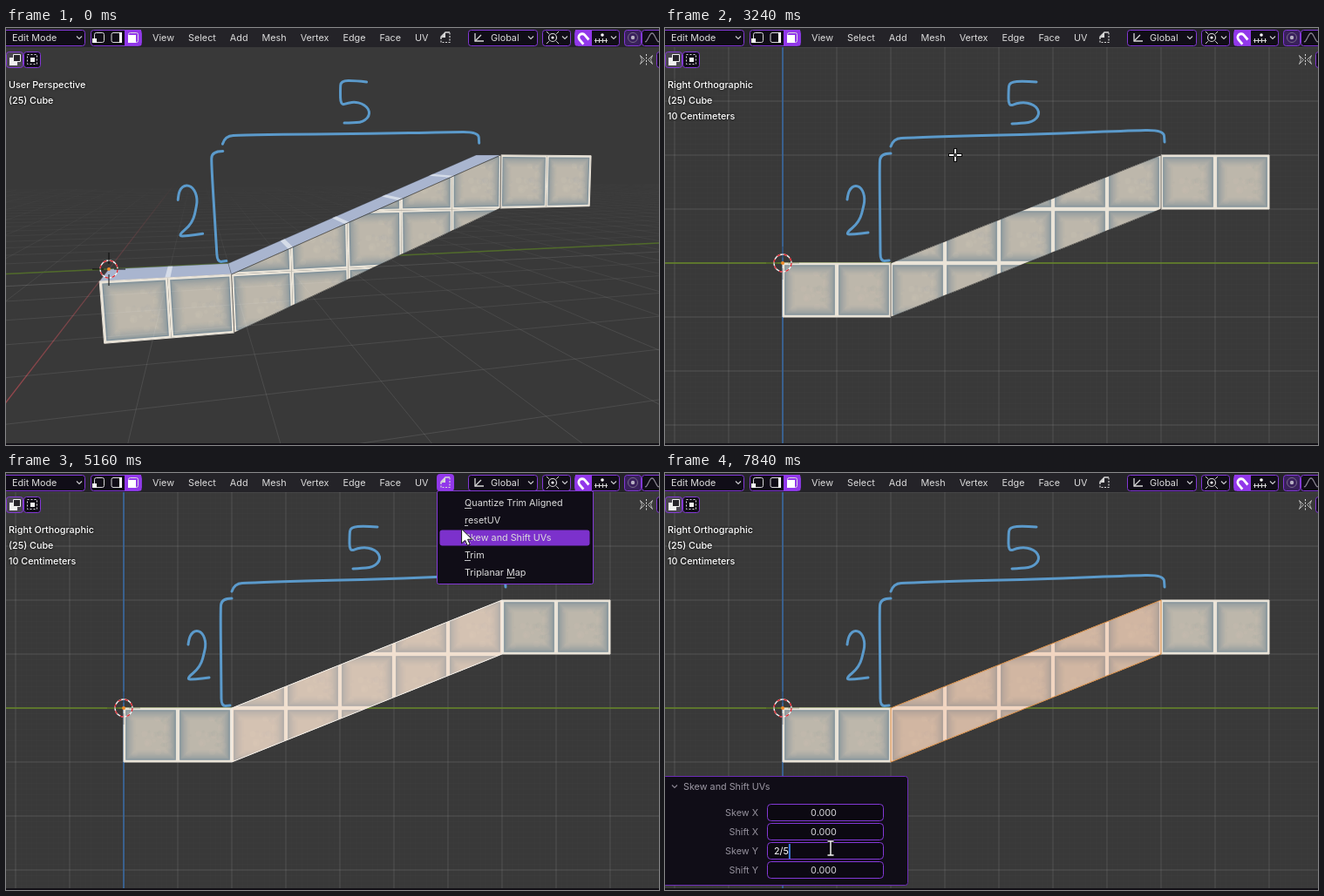
Recreate the animation shown at these times as an HTML page with a canvas. Size 749 by 479 pixels, loop 8000 ms.

```html
<!DOCTYPE html>
<html>
<head>
<meta charset="utf-8">
<style>
  html, body { margin: 0; width: 100%; height: 100%; overflow: hidden; background: #393939; }
  canvas { display: block; }
</style>
</head>
<body>
<canvas id="stage" width="749" height="479"></canvas>
<script>
const W = 749, H = 479, LOOP = 8000;
const ctx = document.getElementById('stage').getContext('2d');
const PURPLE = '#8338d6', BRIGHT = '#9238ea', DARK = '#100d17', ICON = '#d8d8d8';
const FONT = '10.8px Inter, "Open Sans", sans-serif';
const SIDES = [[1, 0], [-1, 0], [0, 1], [0, -1]];

const clamp = v => Math.max(0, Math.min(1, v));
const ease = v => { v = clamp(v); return v * v * (3 - 2 * v); };
const mix = (a, b, k) => a + (b - a) * k;
const rgb = (a, b, k) => `rgb(${a.map((v, i) => Math.round(mix(v, b[i], k)))})`;

// ---- camera: homogeneous columns for x, y, z and the origin ----
const PERSP = [[-21.16, -14.1, -.0966], [76.1, 4.8, .02976], [-6.4, -69, -.01272], [118, 277, 1]];
const ORTHO = [[0, 0, 0], [62, 0, 0], [0, -62, 0], [135, 270, 1]];
let cam = PERSP;

function setView(k) {
  cam = PERSP.map((col, i) => col.map((v, j) => mix(v, ORTHO[i][j], k)));
}
function project(x, y, z) {
  const [X, Y, w] = [0, 1, 2].map(j => cam[0][j] * x + cam[1][j] * y + cam[2][j] * z + cam[3][j]);
  return [X / w, Y / w, w];
}

// ---- drawing helpers ----
function trace(pts, closed = true) {
  ctx.beginPath();
  pts.forEach(([x, y]) => ctx.lineTo(x, y));
  if (closed) ctx.closePath();
}
function fillPoly(pts, color) { trace(pts); ctx.fillStyle = color; ctx.fill(); }
function strokePoly(pts, color, width = 1, closed = true) {
  trace(pts, closed);
  ctx.strokeStyle = color; ctx.lineWidth = width; ctx.stroke();
}
const line = (x1, y1, x2, y2, color, width = 1) => strokePoly([[x1, y1], [x2, y2]], color, width, false);
function rect(x, y, w, h, color) { ctx.fillStyle = color; ctx.fillRect(x, y, w, h); }
function box(x, y, w, h, fill, border, r = 3) {
  ctx.beginPath();
  ctx.roundRect(x + .5, y + .5, w - 1, h - 1, r);
  if (fill) { ctx.fillStyle = fill; ctx.fill(); }
  if (border) { ctx.strokeStyle = border; ctx.lineWidth = 1; ctx.stroke(); }
}
const button = (x, w, y = 2, fill = DARK) => box(x, y, w, 19, fill, PURPLE);
function text(str, x, y, color = '#dcdcdc', align = 'left', weight = 400) {
  ctx.font = `${weight} ${FONT}`; ctx.textAlign = align; ctx.fillStyle = color;
  ctx.fillText(str, x, y + 4);
  return ctx.measureText(str).width;
}
function circle(x, y, r, fill, stroke, width = 1) {
  ctx.beginPath(); ctx.arc(x, y, r, 0, Math.PI * 2);
  if (fill) { ctx.fillStyle = fill; ctx.fill(); }
  if (stroke) { ctx.strokeStyle = stroke; ctx.lineWidth = width; ctx.stroke(); }
}
function dashed(pattern, paint) { ctx.setLineDash(pattern); paint(); ctx.setLineDash([]); }
const chevron = (x, y = 11, c = '#c8c8cc') => strokePoly([[x - 3, y - 1.5], [x, y + 1.5], [x + 3, y - 1.5]], c, 1.2, false);

// ---- floor and wall grids ----
function floorPiece(a, b, alpha) {
  const p = project(...a), q = project(...b);
  if (p[2] < .1 || q[2] < .1) return;
  const w = (p[2] + q[2]) / 2;
  line(p[0], p[1], q[0], q[1], `rgba(255,255,255,${alpha * .12 / (1 + w * w)})`);
}
function floorGrid(x0, x1, alpha) {
  if (alpha <= 0) return;
  for (let y = -24; y <= 40; y++)
    for (let x = x0; x < x1; x += 2) floorPiece([x, y, 0], [Math.min(x + 2, x1), y, 0], alpha);
  for (let x = x0; x <= x1; x++)
    for (let y = -24; y < 40; y += 4) floorPiece([x, y, 0], [x, y + 4, 0], alpha);
}
function wallGrid(alpha) {
  if (alpha <= 0) return;
  for (const [step, strength, width] of [[6.2, .012, 1], [62, .08, 1.6]]) {
    const color = `rgba(255,255,255,${strength * alpha})`;
    for (let x = 135 % step; x < W; x += step) line(x, 22, x, H, color, width);
    for (let y = 270 % step; y < H; y += step) line(0, y, W, y, color, width);
  }
}
function axes(k) {
  const [ox, oy] = project(0, 0, 0), b = project(0, 40, 0);
  const slope = (b[1] - oy) / (b[0] - ox);
  line(0, oy - slope * ox, W, oy + slope * (W - ox), rgb([80, 106, 42], [101, 134, 36], k), 1.5);
  if (k > .9) line(ox, 22, ox, H, '#3767a0', 1.6);
  if (k === 1) return;
  const near = project(7, 0, 0), far = project(-40, 0, 0);
  const fade = ctx.createLinearGradient(near[0], near[1], far[0], far[1]);
  fade.addColorStop(0, `rgba(172,58,66,${1 - k})`);
  fade.addColorStop(1, 'rgba(172,58,66,0)');
  line(near[0], near[1], far[0], far[1], fade, 1.5);
}

// ---- tiled model ----
let seed = 7;
const rand = () => (seed = seed * 16807 % 2147483647) / 2147483647;
const specks = Array.from({ length: 30 }, () => [.15 + rand() * .7, .15 + rand() * .7, 1 + rand() * 4, rand() < .6]);
const rectPts = (y0, z0, y1, z1) => [[y0, z0], [y1, z0], [y1, z1], [y0, z1]];
const face = pts => pts.map(([y, z]) => project(1, y, z));

function tile(y, z) {
  fillPoly(face(rectPts(y, z, y + 1, z + 1)), '#eae4d8');
  for (let i = 0; i < 12; i++) {
    const d = .035 + i * .017;
    fillPoly(face(rectPts(y + d, z + d, y + 1 - d, z + 1 - d)), rgb([126, 143, 153], [189, 183, 171], (i / 11) ** .45));
  }
  for (const [u, v, r, light] of specks) {
    const [px, py] = project(1, y + u, z + v);
    circle(px, py, r, light ? 'rgba(222,205,184,.09)' : 'rgba(140,156,162,.07)');
  }
}
const LOWER = rectPts(0, -1, 2, 0), UPPER = rectPts(7, 1, 9, 2);
const SLOPE = [[2, -1], [7, 1], [7, 2], [2, 0]];

function part(shape, z0, z1) {
  const ys = shape.map(p => p[0]);
  ctx.save();
  trace(face(shape)); ctx.clip();
  for (let y = Math.min(...ys); y < Math.max(...ys); y++)
    for (let z = z0; z < z1; z++) tile(y, z);
  ctx.restore();
}
function topFace(y0, z0, y1, z1) {
  const at = y => mix(z0, z1, (y - y0) / (y1 - y0));
  const strip = (a, b) => [[0, a], [0, b], [1, b], [1, a]].map(([x, y]) => project(x, y, at(y)));
  fillPoly(strip(y0, y1), '#a9b5cf');
  for (let y = y0 + 1; y < y1; y++) fillPoly(strip(y - .04, y + .04), '#d5dce8');
  strokePoly(strip(y0, y1), 'rgba(60,66,80,.35)', .8);
}
function model(k, state) {
  if (k < 1) { topFace(0, 0, 2, 0); topFace(2, 0, 7, 2); }
  part(LOWER, -1, 0);
  part(SLOPE, -1, 2);
  part(UPPER, 1, 2);
  for (const shape of [LOWER, UPPER]) strokePoly(face(shape), '#e6e0d6');
  const edge = face(SLOPE);
  if (state) fillPoly(edge, state === 1 ? 'rgba(255,215,190,.34)' : 'rgba(255,180,140,.3)');
  strokePoly(edge, ['rgba(30,30,32,.6)', '#f6f1ea', '#d88b42'][state]);
}

// ---- hand-drawn notes, laid out in the side view ----
const arc = (cx, cy, rx, ry, a, b) =>
  Array.from({ length: 9 }, (_, i) => mix(a, b, i / 8)).map(t => [cx + rx * Math.cos(t), cy + ry * Math.sin(t)]);
const NOTES = [
  [[426, 62], [412, 61], [395, 62], [394, 72], [394, 90], ...arc(411, 97.5, 18, 12, -2, 1.7), [398, 110]],
  [...arc(219, 197, 10, 16, Math.PI, 2 * Math.PI + .4), [223, 223], [206, 237], [217, 237], [233, 235]],
  [[259, 144], [247, 144], [246, 160], [247, 250], [247, 268], [257, 267]],
  [[259, 136], [262, 127], [280, 126], [340, 124], [430, 122], [530, 118], [572, 117], [573, 131]]
];
function notes() {
  ctx.strokeStyle = '#5b9acb'; ctx.lineWidth = 3; ctx.lineCap = 'round';
  for (const stroke of NOTES) {
    const pts = stroke.map(([x, y]) => project(0, (x - 135) / 62, (270 - y) / 62));
    const last = pts[pts.length - 1];
    ctx.beginPath();
    ctx.moveTo(pts[0][0], pts[0][1]);
    for (let i = 1; i < pts.length - 1; i++) {
      const [x, y] = pts[i], next = pts[i + 1];
      ctx.quadraticCurveTo(x, y, (x + next[0]) / 2, (y + next[1]) / 2);
    }
    ctx.lineTo(last[0], last[1]);
    ctx.stroke();
  }
  ctx.lineCap = 'butt';
}
function sceneCursor(k) {
  const [x, y] = project(0, 0, 0);
  circle(x, y, 10, null, '#f2f2f2', 1.3);
  dashed([4, 4], () => circle(x, y, 10, null, '#e0222c', 1.3));
  for (const [dx, dy] of SIDES)
    line(x + dx * 6, y + dy * 6, x + dx * 19, y + dy * 19, `rgba(8,8,8,${1 - k * .7})`);
  circle(x, y, 2, '#f08a28');
}

// ---- interface ----
function uvIcon(x, y) {
  dashed([2, 1.5], () => strokePoly([[x - 5, y], [x - 5, y + 5.5], [x + 5, y + 5.5], [x + 5, y - 6]], ICON, 1.2, false));
  strokePoly([[x - 5, y + 1], [x - 5, y - 1], [x, y - 6], [x + 5, y - 6]], ICON, 1.3, false);
  fillPoly([[x - 5, y], [x, y - 6], [x, y]], ICON);
}
function selectModes() {
  button(97, 59);
  rect(136, 2, 19, 18, BRIGHT);
  for (let i = 0; i < 3; i++) box(101 + i * 19.5, 5, 12, 12, null, ICON, 2);
  rect(99, 12, 5, 5, '#fff');
  rect(130, 5, 3, 12, '#fff');
  rect(140, 8, 9, 9, '#fff');
}
function orientation() {
  button(530, 80);
  strokePoly([[538, 6], [538, 15], [548, 15]], ICON, 1.3, false);
  line(538, 15, 545, 8, ICON, 1.2);
  text('Global', 556, 11);
  chevron(602);
}
function pivot() {
  button(615, 33);
  circle(627, 11, 4.5, null, ICON, 1.2);
  circle(627, 11, 1.6, '#fff');
  for (let i = 0; i < 4; i++) {
    const a = Math.PI * (i / 2 + .25), c = Math.cos(a), s = Math.sin(a);
    line(627 + c * 6, 11 + s * 6, 627 + c * 10, 11 + s * 10, ICON);
  }
  chevron(641);
}
function snapping() {
  button(652, 52);
  rect(653, 2, 19, 18, BRIGHT);
  ctx.save();
  ctx.translate(661.5, 11.5); ctx.rotate(-.7);
  ctx.beginPath(); ctx.moveTo(-4, 6); ctx.arc(0, -1, 4, Math.PI, 0); ctx.lineTo(4, 6);
  ctx.strokeStyle = '#fff'; ctx.lineWidth = 2.8; ctx.stroke();
  ctx.restore();
  line(675, 14.5, 690, 14.5, ICON);
  for (let x = 676.5; x < 690; x += 4) line(x, 12, x, 17, ICON);
  circle(684, 8, 1.8, '#fff');
  chevron(697);
}
function falloff() {
  button(709, 20, 2, '#39205c');
  circle(719, 11, 5.5, null, '#766a86');
  circle(719, 11, 2.2, '#b9b2c4');
  button(729, 26);
  const bell = Array.from({ length: 17 }, (_, i) => [733 + i, 16 - 10 * Math.sin(Math.PI * i / 16) ** 2]);
  strokePoly(bell, '#8c8794', 1.2, false);
}
function header(active) {
  rect(0, 0, W, 22, '#242328');
  button(-4, 95);
  text('Edit Mode', 7, 11);
  chevron(84);
  selectModes();
  let x = 168;
  for (const name of ['View', 'Select', 'Add', 'Mesh', 'Vertex', 'Edge', 'Face', 'UV'])
    x += text(name, x, 11) + 16;
  if (active) box(494, 1, 20, 20, BRIGHT, BRIGHT);
  uvIcon(504, 11);
  orientation(); pivot(); snapping(); falloff();

  button(0, 20, 27, '#4a4650');
  button(20, 20, 27);
  rect(4, 34, 9, 9, '#f0f0f0');
  box(8, 30, 9, 9, '#26242a', '#f0f0f0', 0);
  dashed([2, 2], () => box(24, 30, 12, 12, null, ICON, 0));
  rect(28, 34, 5, 5, '#eee');
  dashed([2, 1.5], () => line(734.5, 30, 734.5, 43, ICON));
  for (const s of [-1, 1])
    strokePoly([[2, 0], [7, -5], [5, 0], [7, 5]].map(([a, b]) => [734.5 + s * a, 36.5 + b]), '#b8b8b8');
  button(746, 8, 27);
}
function viewLabel(lines) {
  ctx.shadowColor = '#000'; ctx.shadowBlur = 3;
  lines.forEach((s, i) => text(s, 3, 65 + i * 18, '#fff', 'left', 500));
  ctx.shadowBlur = 0;
}
const ITEMS = [['Quantize Trim Aligned', 'Q'], ['resetUV', 'r'], ['Skew and Shift UVs', 'S'], ['Trim', 'T'], ['Triplanar Map', 'M']];
function menu(hover) {
  box(494, 20, 180, 108, DARK, PURPLE, 2);
  ITEMS.forEach(([name, key], i) => {
    const y = 34 + i * 20;
    if (i === hover) box(497, y - 9, 173, 19, '#7c31cc');
    text(name, 526, y);
    const start = 526 + ctx.measureText(name.slice(0, name.indexOf(key))).width;
    line(start, y + 6.5, start + ctx.measureText(key).width, y + 6.5, '#c4c4c8');
  });
}
function panel(t, hover) {
  box(-3, 348, 282, 126, DARK, '#6d2cb8');
  chevron(11, 360, '#87828f');
  text('Skew and Shift UVs', 21, 360, '#9d99a5');
  ['Skew X', 'Shift X', 'Skew Y', 'Shift Y'].forEach((name, i) => {
    const y = 390 + i * 22, editing = i === 2 && t >= 6880;
    text(name, 107, y, '#96929e', 'right');
    box(117, y - 10, 134, 20, !editing && i === hover ? '#282034' : '#0c0912', PURPLE, 4);
    if (!editing) return text('0.000', 182, y, '#d6d6da', 'center');
    const typed = Math.floor((t - 6940) / 300);
    const value = typed > 0 ? '2/5'.slice(0, typed) : '0.0';
    const w = ctx.measureText(value).width;
    if (typed < 1) rect(125, y - 8, w + 1, 17, '#3f5f9c');
    text(value, 125, y, '#fff');
    line(126 + w, y - 8, 126 + w, y + 9, '#3d7de0', 2);
  });
}

// ---- pointer: moves given as start, end, x, y ----
const MOVES = [
  [40, 120, 623, 161], [960, 1520, 604, 132], [2240, 2520, 258, 266],
  [2560, 2960, 259, 149], [3120, 3480, 539, 138], [3480, 3800, 506, 220],
  [4120, 4680, 507, 11], [4840, 5280, 526, 76], [5640, 6600, 190, 431]
];
function pointerAt(t) {
  return MOVES.reduce(([x, y], [start, end, tx, ty]) => {
    const k = ease((t - start) / (end - start));
    return [mix(x, tx, k), mix(y, ty, k)];
  }, [731, 86]);
}
function cross(x, y) {
  x = Math.round(x); y = Math.round(y);
  for (const [color, width, r] of [['rgba(0,0,0,.8)', 4, 8], ['#fff', 2, 7]])
    for (const [dx, dy] of SIDES)
      line(x + dx * 2, y + dy * 2, x + dx * r, y + dy * r, color, width);
}
function arrow(x, y) {
  const pts = [[0, 0], [0, 16.5], [4, 13], [6.8, 19], [9.6, 17.8], [7, 12], [12, 11.8]].map(([a, b]) => [x + a, y + b]);
  fillPoly(pts, '#fff'); strokePoly(pts, '#111');
}
function beam(x, y) {
  for (const [color, width] of [['#111', 3.4], ['#fff', 1.4]]) {
    line(x, y - 8, x, y + 8, color, width);
    for (const s of [-8, 8]) line(x - 3.5, y + s, x + 3.5, y + s, color, width);
  }
}

function draw(t) {
  const k = ease((t - 1800) / 600);
  const state = t < 4160 ? 0 : t < 5640 ? 1 : 2;
  const menuOpen = t >= 4720 && t < 5640;
  const [px, py] = pointerAt(t);
  const overPanel = t >= 5640 && px < 278 && py > 348;
  setView(k);

  rect(0, 0, W, H, '#393939');
  floorGrid(-25, 1, 1 - k);
  wallGrid(clamp(k * 4 - 3));
  axes(k);
  model(k, state);
  floorGrid(1, 20, 1 - k);
  notes();
  sceneCursor(k);
  viewLabel(t < 2320 ? ['User Perspective', '(25) Cube'] : ['Right Orthographic', '(25) Cube', '10 Centimeters']);
  header(t >= 4640 && t < 5640);
  if (menuOpen) menu(t >= 4960 ? Math.floor((py - 24) / 20) : -1);
  if (t >= 5640) panel(t, overPanel ? Math.floor((py - 379) / 22) : -1);
  rect(0, 477, W, 2, '#121016');

  if (t < 40) return;
  if (t >= 6880) beam(px, py);
  else if (menuOpen || overPanel || py < 22) arrow(px, py);
  else cross(px, py);
}

function tick() {
  draw(performance.now() % LOOP);
  requestAnimationFrame(tick);
}
tick();
</script>
</body>
</html>
```
